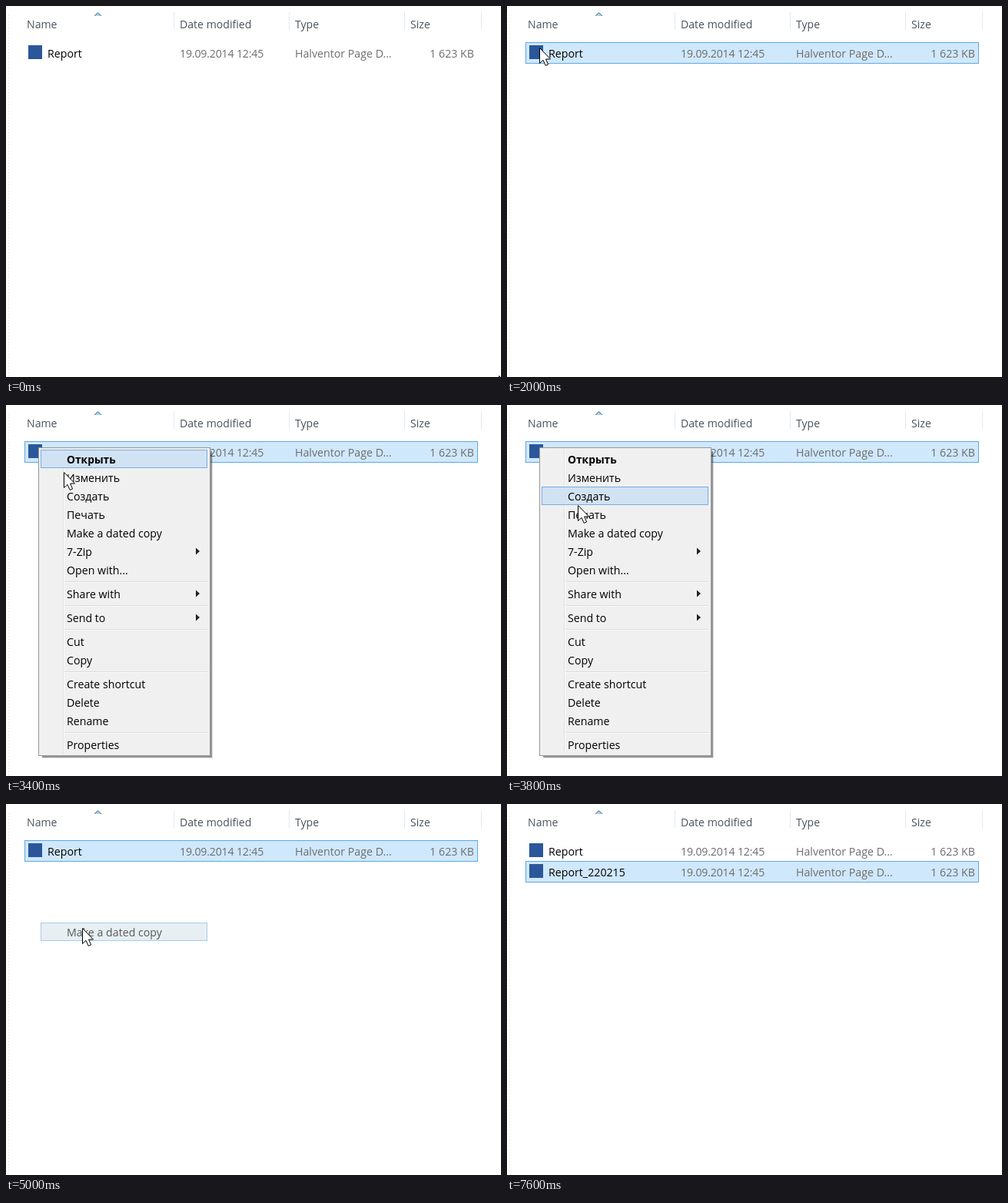
An HTML page that plays this animation: 644 by 482 pixels, repeating every 9.4 s.

```html
<!DOCTYPE html>
<html lang="en">
<head>
<meta charset="utf-8">
<title>Dated copy from the context menu</title>
<style>
  html, body { margin: 0; width: 100%; height: 100%; overflow: hidden; background: #fff; }
  svg { display: block; }
  text { font: 14.2px "Open Sans", "Noto Sans", sans-serif; fill: #000; white-space: pre; }
  .head text { font-size: 14.1px; fill: #4a525e; }
  .detail { fill: #6d6d6d; }
  .date { letter-spacing: -.2px; }
  .hover { fill: #e5f3fb; stroke: #70c0e7; }
  .selected { fill: #d0e8fc; stroke: #5fa8e6; }
  .target { fill: #d1e2f2; stroke: #78aee5; }
  .bold { font-weight: 700; font-size: 13.8px; }
</style>
</head>
<body>
<svg id="stage" width="644" height="482" viewBox="0 0 644 482">
  <rect width="644" height="482" fill="#fff"/>
  <path d="M3.5 12V482" stroke="#dedede" stroke-dasharray="1 3"/>
  <g class="head">
    <path d="M218.5 8V31M368.5 8V31M518.5 8V31M618.5 8V31" stroke="#e3e8f5"/>
    <path d="M115 13L119.5 8.5 124 13Z" fill="#a9cfe6"/>
    <path d="M115 12.8L119.5 8.7 124 12.8" fill="none" stroke="#47708f"/>
    <text x="27" y="29">Name</text>
    <text x="226" y="29">Date modified</text>
    <text x="376" y="29">Type</text>
    <text x="526" y="29">Size</text>
  </g>
  <g id="rows"></g>
  <g id="menu">
    <path d="M47 457H267V60" fill="none" stroke="#000" stroke-opacity=".42" stroke-width="2"/>
    <path d="M48 458.5H268.5V61" fill="none" stroke="#000" stroke-opacity=".12"/>
    <rect x="42.5" y="55.5" width="223" height="400" fill="#f0f0f0" stroke="#979797"/>
    <path d="M74.5 58V453" stroke="#e0e0e0"/>
    <path d="M75.5 58V453" stroke="#fbfbfb"/>
    <rect id="target" class="target" x="45.5" width="216" height="23"/>
    <g id="items"></g>
  </g>
  <g id="fading">
    <rect class="target" x="45.5" y="154.5" width="216" height="23" style="fill:#dbe7ee"/>
    <text x="79" y="172">Make a dated copy</text>
  </g>
  <path id="cursor" d="M.5 .5V20.5L5 16.3 8.2 23.4 11.6 21.9 8.6 15H14.5Z" fill="#fff" stroke="#000"/>
</svg>
<script>
const LOOP = 9400, STEP = 200;
const byId = id => document.getElementById(id);
const show = (node, on, opacity = 1) => {
  node.style.display = on ? "" : "none";
  node.style.opacity = opacity;
};

const fileRow = (name, y) => `<g>
  <rect x="24.5" y="${y + .5}" width="589" height="27"/>
  <rect x="29" y="${y + 4}" width="18" height="18" fill="#2b579a"/>
  <text x="54" y="${y + 20}">${name}</text>
  <text class="detail date" x="226" y="${y + 20}">19.09.2014 12:45</text>
  <text class="detail" x="376" y="${y + 20}">Halventor Page D...</text>
  <text class="detail" x="609" y="${y + 20}" text-anchor="end">1 623 KB</text>
</g>`;
const rowTops = [47, 74];
byId("rows").innerHTML = fileRow("Report", rowTops[0]) + fileRow("Report_220215", rowTops[1]);
const rows = [...byId("rows").children];

// "-" is a separator, a trailing ">" marks a submenu
const entries = ["Открыть", "Изменить", "Создать", "Печать", "Make a dated copy", "7-Zip>",
  "Open with...", "-", "Share with>", "-", "Send to>", "-", "Cut", "Copy", "-",
  "Create shortcut", "Delete", "Rename", "-", "Properties"];

function menuItems() {
  let y = 59, markup = "";
  entries.forEach((entry, i) => {
    if (entry === "-") {
      markup += `<path d="M76 ${y + 2.5}H262" stroke="#dcdcdc"/><path d="M76 ${y + 3.5}H262" stroke="#fafafa"/>`;
      y += 7;
      return;
    }
    markup += `<text x="79" y="${y + 17}"${i ? "" : ' class="bold"'}>${entry.replace(">", "")}</text>`;
    if (entry.endsWith(">")) markup += `<path d="M247 ${y + 6.5}l5 4.5l-5 4.5Z" fill="#222"/>`;
    y += 24;
  });
  return markup;
}
byId("items").innerHTML = menuItems();

// time, x, y of the pointer tip
const path = [
  [0, 641, 480], [1200, 100, 61], [1800, 42, 54], [3000, 42, 54], [3400, 75, 87],
  [3800, 92, 130], [4200, 99, 154], [4600, 99, 161], [5200, 99, 161],
  [5800, 106, 92], [6400, 106, 92], [7400, 375, 442], [LOOP, 375, 442]
];

function pointerAt(t) {
  const i = path.findIndex(p => p[0] > t);
  const [t0, x0, y0] = path[i - 1], [t1, x1, y1] = path[i];
  const k = (t - t0) / (t1 - t0);
  return [Math.round(x0 + (x1 - x0) * k), Math.round(y0 + (y1 - y0) * k)];
}

function render(ms) {
  const t = Math.floor(ms % LOOP / STEP) * STEP;
  const [x, y] = pointerAt(t);
  byId("cursor").setAttribute("transform", `translate(${x} ${y})`);
  show(byId("cursor"), t < 7600);

  const menuOpen = t >= 2600 && t < 5000;
  show(byId("menu"), menuOpen, t < 2800 ? .5 : 1);
  show(byId("target"), t >= 3200);
  const active = Math.max(0, Math.min(4, (t - 3400) / STEP));
  byId("target").setAttribute("y", 58.5 + 24 * active);
  show(byId("fading"), t >= 5000 && t < 5400, t < 5200 ? .65 : .3);

  const selected = t < 2000 ? -1 : t < 6400 ? 0 : 1;
  rows.forEach((row, i) => {
    const hovered = !menuOpen && y >= rowTops[i] && y < rowTops[i] + 27;
    const box = row.firstElementChild;
    box.setAttribute("class", i === selected ? "selected" : "hover");
    show(box, i === selected || hovered);
    show(row, i === 0 || t >= 5400);
  });
}

const start = performance.now();
function tick() {
  render(performance.now() - start);
  requestAnimationFrame(tick);
}
tick();
</script>
</body>
</html>
```
